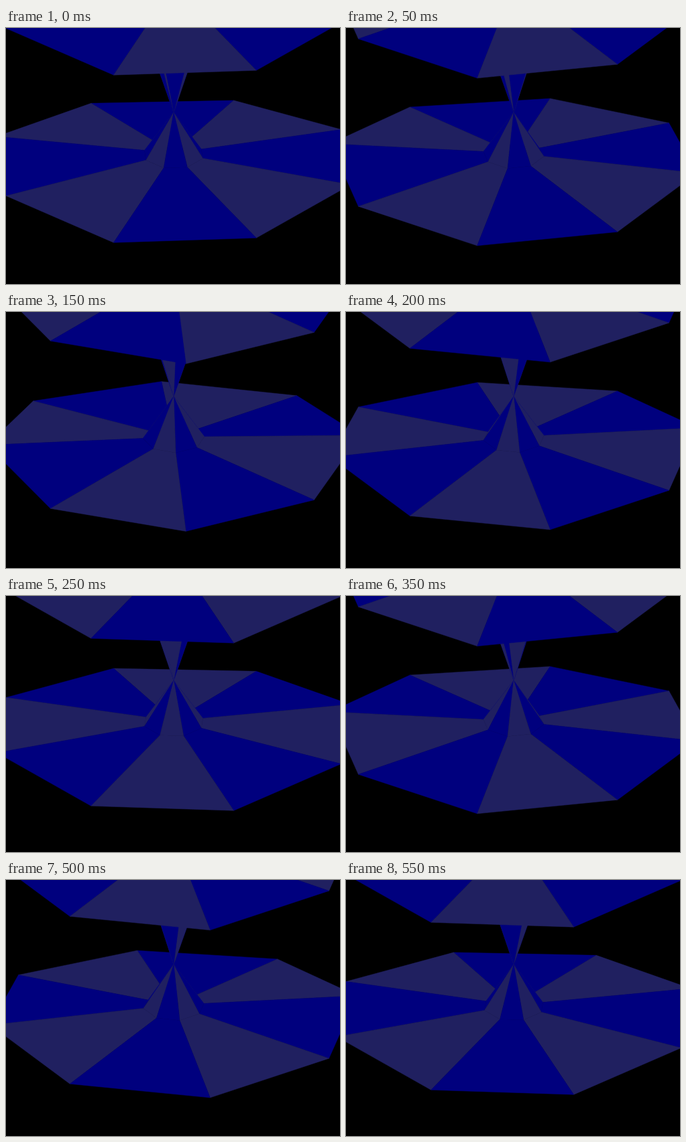
An HTML page with a canvas for the animation above (600 ms loop, 498 px wide and 382 px high).

```html
<!DOCTYPE html>
<html lang="en">
<head>
<meta charset="utf-8">
<title>Spinning funnels</title>
<style>
  html, body { margin: 0; width: 100%; height: 100%; overflow: hidden; background: #000; }
  canvas { display: block; }
</style>
</head>
<body>
<canvas id="stage" width="498" height="382"></canvas>
<script>
const ctx = document.getElementById('stage').getContext('2d');
const COLORS = ['#00007e', '#202060'];
const SIDES = 8, SECTOR = 360 / SIDES;
const LOOP = 600, STEP = 50, TURN = 7.5;   // ms, ms, degrees per step
const CX = 250, STACK = 250;
const APEX = [CX, 126];

// Rings are flattened more behind the axis than in front of it.
function ring(deg, radius, y, near, far) {
  const a = deg * Math.PI / 180, c = Math.cos(a);
  return [CX + radius * Math.sin(a), y + c * (c > 0 ? near : far)];
}
const rim = (deg, lift = 0) => ring(deg, 278.5, 189.5 - lift, 138, 86);
const hub = (deg, lift = 0) => ring(deg, 46, 187 - lift, 23, 14.2);
const neck = deg => ring(deg, 46, -30, 87, 54);

function fill(points, color) {
  ctx.beginPath();
  points.forEach(p => ctx.lineTo(...p));
  ctx.closePath();
  ctx.fillStyle = ctx.strokeStyle = color;
  ctx.fill();
  ctx.stroke();
}

function plate(sectors, lift, flip) {
  for (const { a, b, tone } of sectors) {
    fill([rim(a, lift), rim(b, lift), hub(b, lift), hub(a, lift)], COLORS[tone ^ flip]);
  }
}

function cone(sectors, edge) {
  for (const { a, b, tone } of sectors) fill([APEX, edge(a), edge(b)], COLORS[tone]);
}

function draw(step) {
  const sectors = Array.from({ length: SIDES }, (_, i) => {
    const mid = 3.75 + step * TURN + i * SECTOR;
    // angle measured from the left, where the upper cone's faces close up
    const order = (mid + 112.5) % 360;
    return { a: mid - SECTOR / 2, b: mid + SECTOR / 2, tone: i % 2, order,
             depth: Math.cos(mid * Math.PI / 180) };
  });
  const byDepth = [...sectors].sort((p, q) => p.depth - q.depth);
  const around = [...sectors].sort((p, q) => q.order - p.order);

  ctx.fillStyle = '#000';
  ctx.fillRect(0, 0, 498, 382);
  ctx.lineWidth = 0.5;
  ctx.lineJoin = 'round';

  plate(byDepth, 0, 0);
  cone(around, neck);
  cone(byDepth, hub);
  plate(byDepth, STACK, 1);
}

function tick() {
  draw(Math.floor(performance.now() % LOOP / STEP));
  requestAnimationFrame(tick);
}
tick();
</script>
</body>
</html>
```
